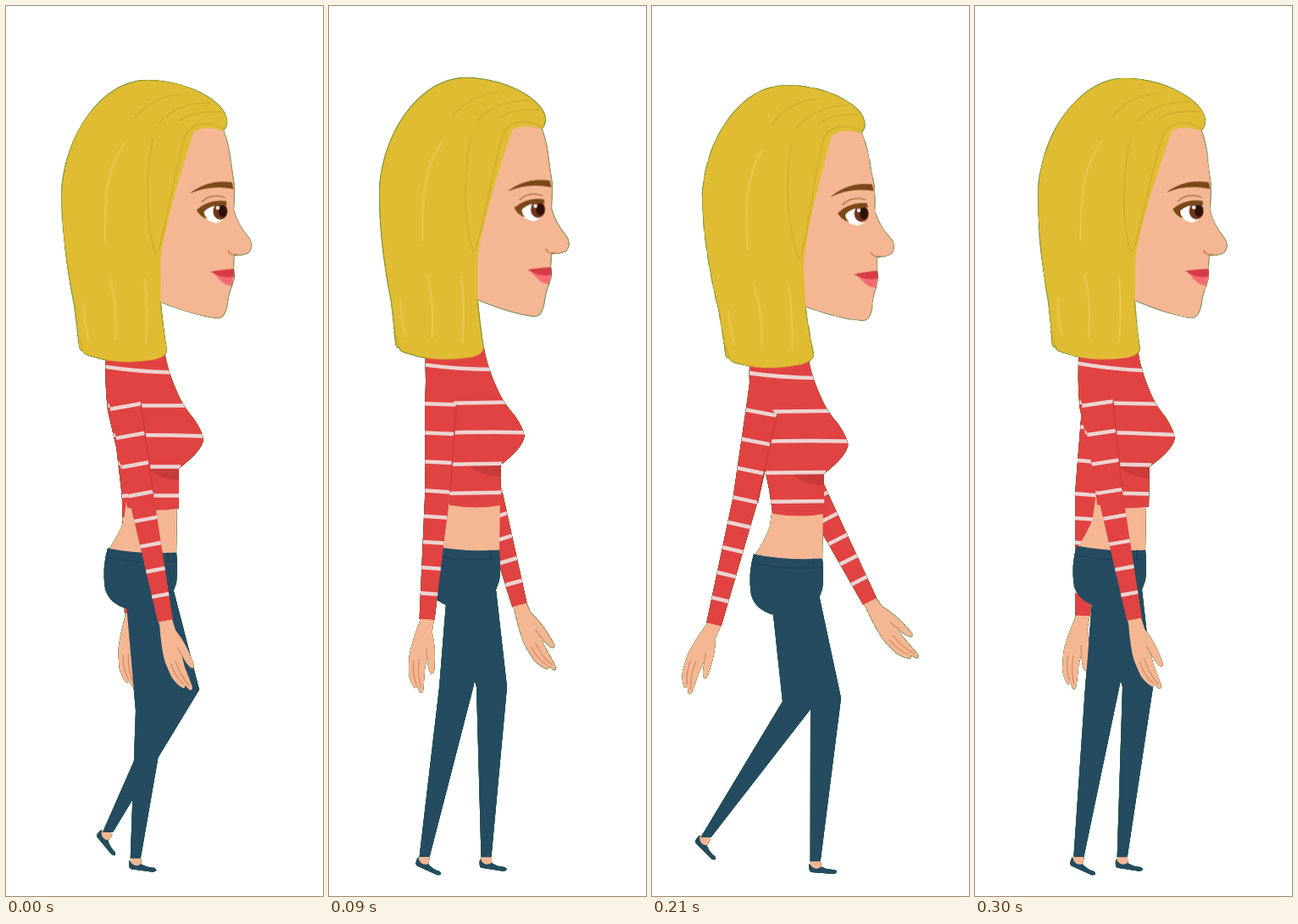
Write an HTML page that moves like this. It is 374 by 1048 pixels and loops after 330 ms.

```html
<!DOCTYPE html>
<html lang="en">
<head>
<meta charset="utf-8">
<title>Walk cycle</title>
<style>
  html, body { margin: 0; width: 100%; height: 100%; overflow: hidden; background: #fff; }
  svg { display: block; width: 374px; height: 1048px; }
  #figure { filter: drop-shadow(0 0 .5px #14661a) drop-shadow(0 0 .4px #14661a); }
  .skin { fill: #f5b793; }
  .pants { fill: #254b60; }
  .band { fill: none; stroke: #1d3f53; stroke-width: 1.2; }
  .red { fill: #e04341; }
  .shade { fill: #c93a3a; }
  .stripe { fill: none; stroke: #ecd4d2; stroke-width: 4.5; }
  .fold { fill: none; stroke: #c93a38; stroke-width: 1.3; }
  .crease { fill: none; stroke: #d08a66; stroke-width: 1.2; }
  .hair { fill: #e0bc33; }
  .strand { fill: none; stroke: #d2ab2b; stroke-width: 1.6; }
  .shine { fill: none; stroke: #e6c748; stroke-width: 2.4; }
  .brown { fill: #7a4819; }
</style>
</head>
<body>
<svg viewBox="0 0 374 1048">
  <defs>
    <clipPath id="shirtClip"><use href="#shirt"/></clipPath>
    <path id="shirt" d="M118 408L187 404Q190 428 205 460Q211 472 222 485Q232 500 233 509Q231 523 204 543V590Q175 595 143 589L139 560L134 535L120 475Q116 440 118 408Z"/>
    <g id="hand">
      <path class="skin" d="M-8-4V4Q-13 34-12 48L-9 66Q-5 77 1 82Q4 83 4 79L8 86Q12 88 12 82L9 58V43Q12 58 17 62Q21 62 20 56Q17 30 9 14L8-4Z"/>
      <path class="crease" d="M-6 50Q-5 66 3 78M0 48Q1 66 9 81M9 44L6 34"/>
    </g>
    <g id="foot">
      <path class="skin" d="M-6-2H6L8 9H-5Z"/>
      <path class="pants" d="M-7 3Q-8 12-4 13L22 14Q29 12 23 9Q15 10 7 6Q0 12-7 3Z"/>
    </g>
  </defs>
  <g id="figure">
    <g id="farArm"><use href="#hand"/><path class="red"/><path class="stripe"/></g>
    <g id="legA"><use href="#foot"/><path class="pants"/></g>
    <g id="legB"><use href="#foot"/><path class="pants"/></g>
    <g id="pelvis">
      <path class="skin" d="M143 575L139 604Q134 620 120 640L201 646L202 575Z"/>
      <path class="pants" d="M120 637Q160 645 201 642Q203 660 201 678L195 694L196 704L142 708Q122 702 117 685Q113 660 120 637Z"/>
      <path class="band" d="M119 648Q160 656 202 652M191 642V653"/>
    </g>
    <g id="torso">
      <use href="#shirt" class="red"/>
      <g clip-path="url(#shirtClip)">
        <path class="shade" d="M164 541H205V557Q181 556 164 541Z"/>
        <path class="stripe" d="M116 423Q155 429 196 430M120 469H216M124 504Q180 503 236 505M130 541H206M138 575H206"/>
      </g>
    </g>
    <g id="nearArm"><use href="#hand"/><path class="red"/><path class="stripe"/><path class="fold"/></g>
    <g id="head">
      <path class="skin" d="M204 138H254L258 147Q264 163 266 185L270 212L269 240Q274 258 287 273Q293 282 286 290Q279 294 269 292L268 309L269 319L266 329Q262 338 260 354Q257 367 249 367Q222 364 181 347L170 290Z"/>
      <path class="hair" d="M167 86C218 86 262 114 262 135Q261 146 255 146Q234 139 222 148C206 198 184 266 182 302V350Q185 380 189 405Q187 412 175 415Q132 422 101 411Q90 409 89 403Q85 408 84 385L80 350Q66 280 66 222C68 150 115 86 167 86Z"/>
      <path class="strand" d="M152 132Q170 107 207 103M181 137Q203 112 243 113M206 134Q222 122 255 124M257 144Q230 129 214 148C199 190 194 240 179 290M174 155C165 200 164 255 177 292M84 385Q87 393 89 403"/>
      <path class="shine" d="M141 160C118 190 116 230 117 278M122 318Q131 350 128 392M163 320Q167 355 164 397M91 347Q91 370 97 391"/>
      <path class="brown" d="M217 220Q238 203 267 207L269 215Q241 209 217 220Z"/>
      <path class="crease" style="stroke:#a9693c" d="M231 230Q242 219 259 225"/>
      <path fill="#fff" d="M230 241Q238 232 258 231L261 241Q258 253 248 255Q235 253 230 241Z"/>
      <ellipse cx="253" cy="241" rx="8.5" ry="10" fill="#70341c"/>
      <ellipse cx="256" cy="241" rx="5" ry="7" fill="#2e110b"/>
      <circle cx="250" cy="237" r="2.2" fill="#fff"/>
      <path class="brown" d="M225 239Q240 226 260 229L261 234Q243 232 234 241Q234 247 238 250Q229 248 225 239Z"/>
      <path class="crease" style="stroke:#c67b50;stroke-width:1.6" d="M262 287Q265 294 273 292"/>
      <path fill="#f76a74" d="M246 315L268 317L266 329Q256 329 246 315Z"/>
      <path fill="#d63c45" d="M241 312Q252 310 268 309L269 318Q254 321 241 312Z"/>
    </g>
  </g>
</svg>
<script>
const STEP = 30, STEPS = 11;

// the three leg poses of the walk: body drop, knees, back ankle, front ankle x
const pass = { drop: 1.5, kneeA: [208, 805], kneeB: [171, 830], ankleA: [114, 973], ankleB: 160 };
const stand = { drop: -1.5, kneeA: [150, 803], kneeB: [192, 802], ankleA: [118, 1002], ankleB: 179 };
const stride = { drop: 8.5, kneeA: [174, 819], kneeB: [205, 815], ankleA: [74, 979], ankleB: 180 };

// near and far: arm swing from 0 (wide open) to 1 (crossed over the body); lean in degrees
const keys = [
  { step: 0, legs: pass, near: 1, far: .94, lean: 0 },
  { step: 1, legs: stand, near: .47, far: .38, lean: -1 },
  { step: 3, legs: stand, near: .37, far: .28, lean: -1 },
  { step: 5, legs: stride, near: 0, far: 0, lean: -.7 },
  { step: 7, legs: stride, near: 0, far: 0, lean: -.7 },
  { step: 8, legs: pass, near: .19, far: .26, lean: 0 },
  { step: 10, legs: stand, near: 1, far: 1.13, lean: 1.2 }
];

const el = id => document.getElementById(id);
const poly = pts => 'M' + pts.map(p => p.map(v => v.toFixed(1)).join(' ')).join('L');
const place = (node, [x, y], turn) => node.setAttribute('transform', `translate(${x} ${y}) rotate(${turn})`);

// blends numbers, and arrays or objects of numbers
function mix(a, b, u) {
  if (typeof a === 'number') return a + (b - a) * u;
  if (Array.isArray(a)) return a.map((v, i) => mix(v, b[i], u));
  return Object.fromEntries(Object.keys(a).map(k => [k, mix(a[k], b[k], u)]));
}

function poseAt(step) {
  const next = Math.max(1, keys.findIndex(k => k.step >= step));
  const a = keys[next - 1], b = keys[next];
  return mix(a, b, (step - a.step) / (b.step - a.step));
}

function drawArm(id, shoulder, top, elbow, wrist, turn) {
  const [hand, sleeve, stripes, fold] = el(id).children;
  const joints = [shoulder, elbow, wrist], widths = [37, 29.5, 18];
  const [upper, lower] = [0, 1].map(i =>
    Math.atan2(joints[i + 1][1] - joints[i][1], joints[i + 1][0] - joints[i][0]));
  const angles = [upper, (upper + lower) / 2, lower];
  // left and right edge at u: 0 shoulder, 1 elbow, 2 wrist
  const edges = u => {
    const i = Math.min(1, Math.floor(u));
    const along = list => mix(list[i], list[i + 1], u - i);
    const [x, y] = along(joints), a = along(angles), half = along(widths) / 2;
    return [half, -half].map(w => [x - w * Math.sin(a), y + w * Math.cos(a)]);
  };
  const rows = [0, 1, 2].map(edges);
  sleeve.setAttribute('d', poly([top, ...rows.map(r => r[0]), ...rows.map(r => r[1]).reverse()]) + 'Z');
  let marks = '';
  for (let i = 0; i < 8; i++) marks += poly(edges(i < 3 ? i / 3 : 1 + (i - 3) / 5));
  stripes.setAttribute('d', marks);
  if (fold) fold.setAttribute('d', poly([rows[0][1], rows[1][1]]));
  place(hand, wrist, turn);
}

function drawLeg(id, drop, [kx, ky], width, [ax, ay], turn) {
  const [foot, leg] = el(id).children;
  leg.setAttribute('d', poly([
    [140, 680 + drop], [196, 680 + drop], [kx + width / 2, ky], [ax + 6, ay],
    [ax - 6, ay], [kx - width / 2, ky]
  ]) + 'Z');
  place(foot, [ax, ay], turn);
}

function draw(step) {
  const { legs, near, far, lean } = poseAt(step);
  const { drop, kneeA, kneeB, ankleA: [backX, backY], ankleB: frontX } = legs;

  // the feet drift apart and together once per loop
  const spread = 4 - 10 * Math.cos(2 * Math.PI * step / STEPS);
  const lift = 1002 - backY;
  drawLeg('legA', drop, kneeA, 40, [backX - spread, backY], 22 + .9 * lift);
  drawLeg('legB', drop, kneeB, 36, [frontX + 1.2 * spread, 1003 + drop / 2], 6 - drop / 2);

  // the torso leans about the waist
  const a = lean * Math.PI / 180;
  const onTorso = (x, y) => [
    160 + (x - 160) * Math.cos(a) - (y - 640) * Math.sin(a),
    640 + drop + (x - 160) * Math.sin(a) + (y - 640) * Math.cos(a)
  ];
  place(el('pelvis'), [0, drop], 0);
  el('torso').setAttribute('transform', `translate(0 ${drop}) rotate(${lean} 160 640)`);
  el('head').setAttribute('transform',
    `translate(${5.5 * lean + .7 * drop} ${drop}) rotate(${.4 * lean - .28 * drop} 140 410)`);

  drawArm('nearArm', onTorso(131 + 10 * near, 470), onTorso(118, 432),
    [110 + 49 * near, 573 + drop], [73 + 115 * near, 723 + .6 * drop], 26 - 40 * near);
  drawArm('farArm', onTorso(142, 460), onTorso(122, 430),
    [194 - 48 * far * far, 576 + .4 * drop], [257 - 115 * far, 701 + 15 * far], 42 * far - 34);
}

const start = performance.now();
let shown = 0;
function tick() {
  const step = Math.floor((performance.now() - start) / STEP) % STEPS;
  if (step !== shown) draw(shown = step);
  requestAnimationFrame(tick);
}
draw(0);
tick();
</script>
</body>
</html>
```
